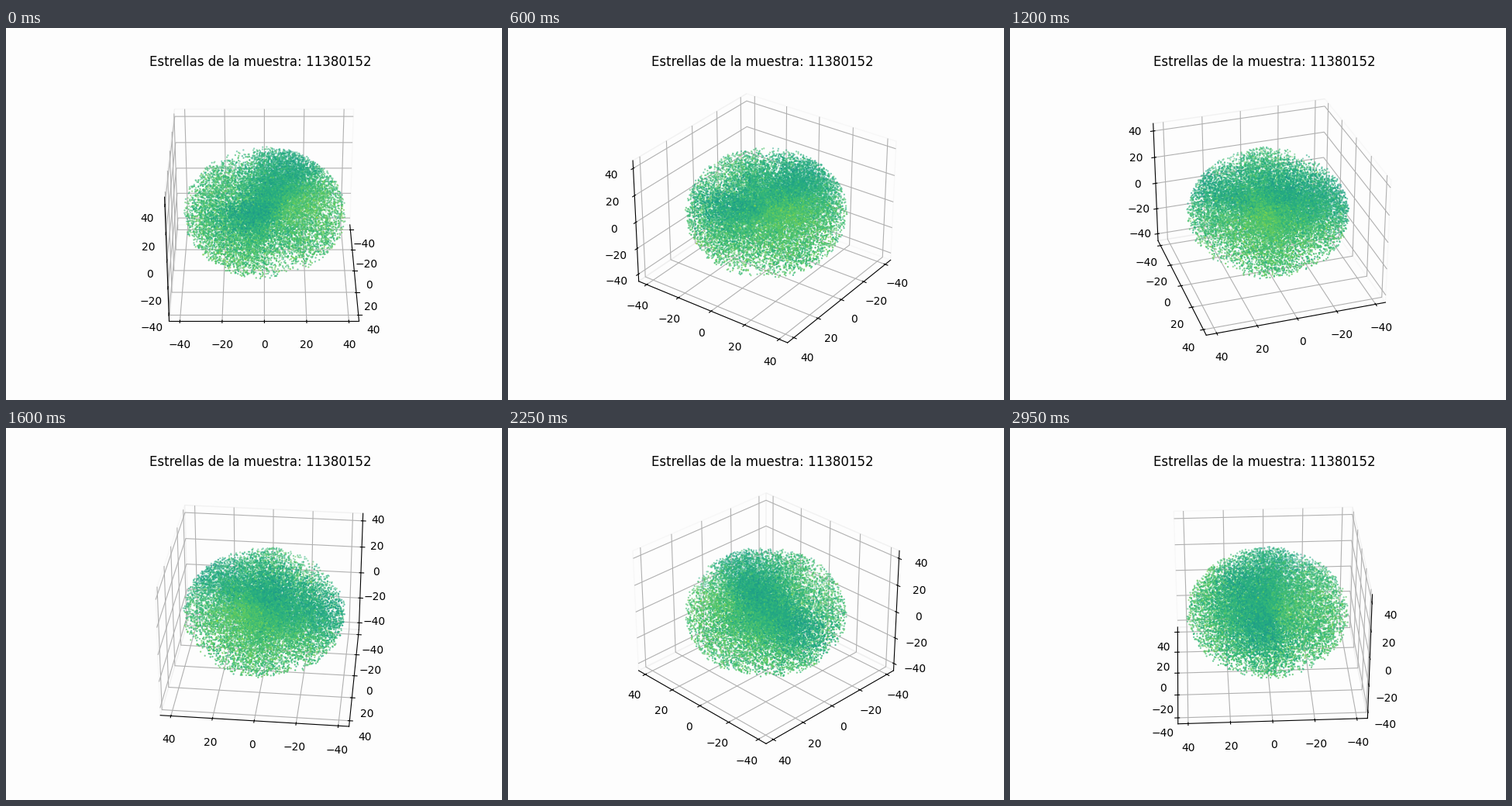
Write a matplotlib script that moves like this. It is 640 px wide and 480 px high and loops after 3 s.

```python
import numpy as np
import matplotlib.pyplot as plt
from matplotlib.animation import FuncAnimation

FRAMES, INTERVAL = 60, 50
STEP = 180 / FRAMES
STARS, RADIUS = 19000, 39.7
PAPER = "#fdfdfd"

# sky directions as (longitude, latitude) in degrees
DENSE = [(175, 15), (-21, 38), (109, 63)]
BRIGHT = [(66, 36)]
DUST = [(215, 52), (-47, 51), (33, 30), (195, 25)]

rng = np.random.default_rng(7)


def unit(lon, lat):
    lon, lat = np.radians([lon, lat])
    return np.array([np.cos(lon) * np.cos(lat), np.sin(lon) * np.cos(lat), np.sin(lat)])


def spots(dirs, centres, width, both_ends=False):
    """Sum of smooth spots on the sphere, optionally with their antipodes."""
    total = 0
    for centre in centres:
        d = dirs @ unit(*centre)
        total = total + np.exp(((abs(d) if both_ends else d) - 1) / width ** 2)
    return total


def make_stars():
    dirs = rng.normal(size=(8 * STARS, 3))
    dirs /= np.linalg.norm(dirs, axis=1, keepdims=True)
    density = .55 + spots(dirs, DENSE, .42) + .3 * spots(dirs, BRIGHT, .3)
    density *= np.clip(1 - spots(dirs, DUST, .22, True), .05, 1)
    pick = rng.choice(len(dirs), STARS, replace=False, p=density / density.sum())
    dirs = dirs[pick]
    r = RADIUS * rng.random(STARS) ** .56
    tone = .69 - .11 * np.clip(spots(dirs, DENSE, .42), 0, 1) + .06 * spots(dirs, BRIGHT, .3)
    tone += rng.normal(0, .035, STARS) + .02 * rng.exponential(1, STARS)
    return (dirs * r[:, None]).T, np.clip(tone, .5, .93)


fig = plt.figure(figsize=(6.4, 4.8), dpi=100, facecolor=PAPER)
ax = fig.add_subplot(projection="3d", facecolor=PAPER)
(x, y, z), tone = make_stars()
ax.scatter(x, y, z, c=tone, cmap="viridis", vmin=0, vmax=1, s=2.7, linewidths=0)

ax.set(xlim=(-45.1, 45.1), ylim=(-45.1, 44.8), zlim=(-45.6, 45.6))
for axis in (ax.xaxis, ax.yaxis, ax.zaxis):
    axis.set_ticks(range(-40, 41, 20))
    axis.pane.fill = False
ax.set_title("Estrellas de la muestra: 11380152")


def update(i):
    # a hair off the right angles keeps the choice of back walls stable
    ax.view_init(elev=30, azim=max(STEP * i - 1e-6, 1e-6))
    return ()


anim = FuncAnimation(fig, update, frames=FRAMES, interval=INTERVAL,
                     init_func=lambda: update(0), repeat=True, repeat_delay=0)
plt.show()
```
